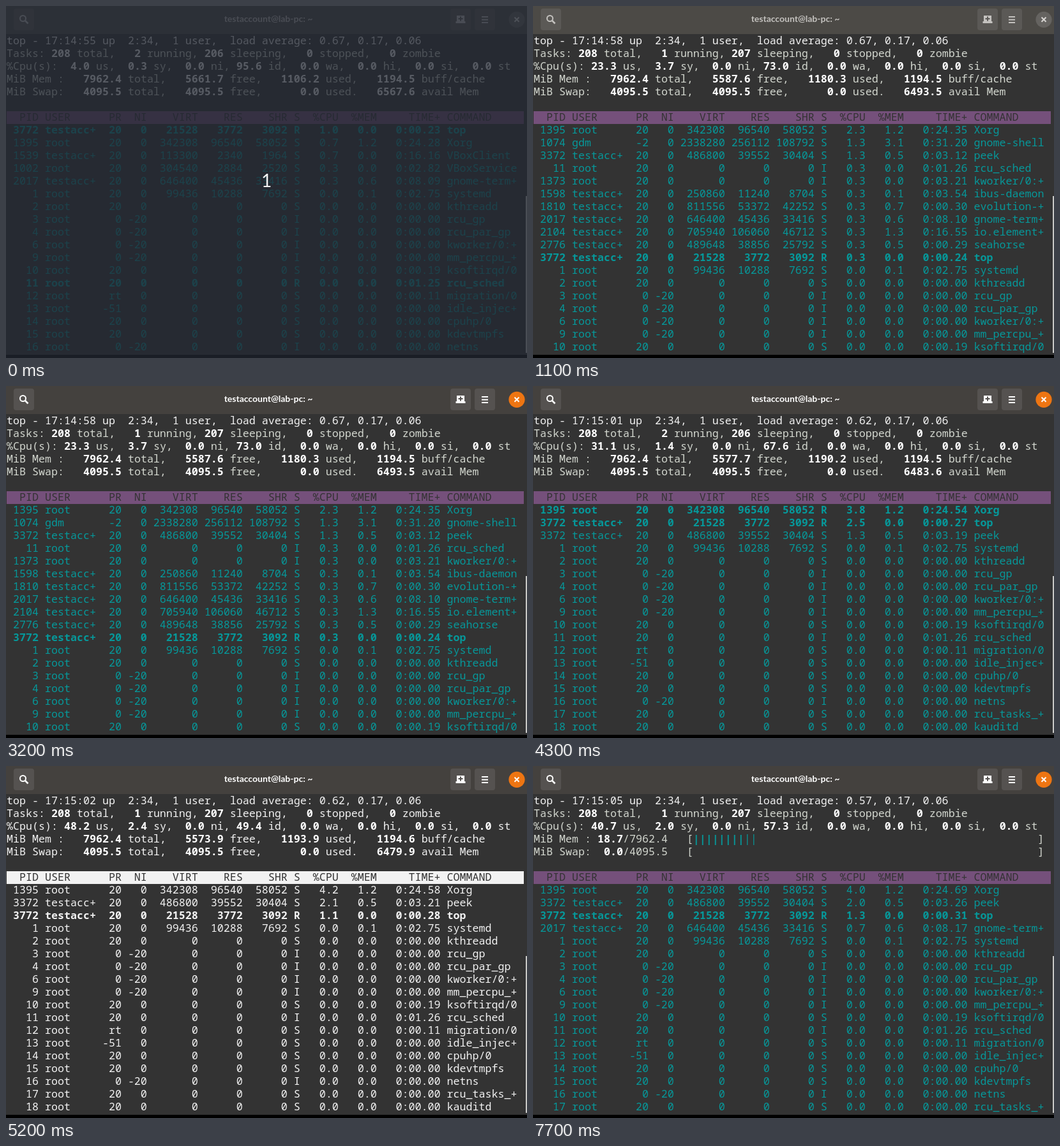
Animation of 816 by 552 pixels, one loop 8000 ms. Source, as an HTML page:

```html
<!DOCTYPE html>
<html lang="en">
<head>
<meta charset="utf-8">
<title>Process monitor</title>
<style>
html, body { margin: 0; width: 100%; height: 100%; overflow: hidden; background: #333; }
svg { display: block; width: 816px; height: 552px; }
.line { font: 16.6667px "Noto Sans Mono", monospace; white-space: pre; fill: #06989a; }
.summary { fill: #d3d7cf; }
.uptime { fill: #f2f2f2; }
.bold { font-weight: 700; }
.summary .bold { fill: #fff; }
.summary .gauge { fill: #06989a; }
.bar { fill: #75507b; }
.columns { fill: #333; }
.mono .line, .mono .bar { fill: #f2f2f2; }
.mono .columns { fill: #333; }
.title { font: 700 14px Lato, "Open Sans", sans-serif; text-anchor: middle; }
.head { fill: #4c4a46; }
.button { fill: #5b5956; }
.ink { fill: #c4c2bf; }
.stroke { fill: none; stroke: #c4c2bf; stroke-width: 2; }
.close { fill: #656360; }
.cross { fill: none; stroke: #d8d6d3; stroke-width: 2; }
.focused .head { fill: #44413e; }
.focused .button { fill: #555250; }
.focused .ink { fill: #fff; }
.focused .stroke, .focused .cross { stroke: #fff; }
.focused .close { fill: #ee7512; }
.count { font: 28px Lato, sans-serif; text-anchor: middle; fill: #f4f4f4; }
</style>
</head>
<body>
<svg id="stage" viewBox="0 0 816 552">
  <rect width="816" height="552" fill="#333"/>
  <rect class="head" width="816" height="44"/>
  <rect class="button" x="12" y="4" width="32" height="34" rx="4"/>
  <rect class="button" x="696" y="4" width="32" height="34" rx="4"/>
  <rect class="button" x="734" y="4" width="32" height="34" rx="4"/>
  <g class="stroke">
    <circle cx="26.5" cy="19.5" r="4.5"/>
    <path d="M29.7 22.7L34.5 27.5" stroke-width="2.6"/>
  </g>
  <text class="title ink" x="411" y="25">testaccount@lab-pc: ~</text>
  <path class="ink" fill-rule="evenodd" d="M706 15H718V24H719.5V27H704.5V24H706ZM711 16.5V19H708.5V21H711V23.5H713V21H715.5V19H713V16.5Z"/>
  <path class="stroke" d="M745 17H755M745 21.5H755M745 26H755"/>
  <circle class="close" cx="800" cy="21.3" r="12.6"/>
  <path class="cross" d="M796.5 17.8L803.5 24.8M803.5 17.8L796.5 24.8"/>
  <g id="screens"></g>
  <rect x="814" y="298" width="2" height="246" fill="#c8c8c6"/>
  <rect y="547" width="816" height="5" fill="#000"/>
  <g id="countdown">
    <rect width="816" height="552" fill="#232832" fill-opacity=".76"/>
    <text class="count" x="408" y="284">1</text>
  </g>
</svg>
<script>
const LOOP = 8000, FOCUS_AT = 3200, COUNTDOWN_END = 200;
const ROWS = 18;
const USER = "testacc+";
const stage = document.getElementById("stage");
const countdown = document.getElementById("countdown");

// pid: command, user, PR, NI, VIRT, RES, SHR, %MEM
const processes = {
  1: ["systemd", "root", 20, 0, 99436, 10288, 7692, "0.1"],
  2: ["kthreadd"], 3: ["rcu_gp", "root", 0, -20], 4: ["rcu_par_gp", "root", 0, -20],
  6: ["kworker/0:+", "root", 0, -20], 9: ["mm_percpu_+", "root", 0, -20],
  10: ["ksoftirqd/0"], 11: ["rcu_sched"], 12: ["migration/0", "root", "rt"],
  13: ["idle_injec+", "root", -51], 14: ["cpuhp/0"], 15: ["kdevtmpfs"],
  16: ["netns", "root", 0, -20], 17: ["rcu_tasks_+"], 18: ["kauditd"],
  1002: ["VBoxService", "root", 20, 0, 304540, 2884, 2520],
  1074: ["gnome-shell", "gdm", -2, 0, 2338280, 256112, 108792, "3.1"],
  1373: ["kworker/0:+"],
  1395: ["Xorg", "root", 20, 0, 342308, 96540, 58052, "1.2"],
  1539: ["VBoxClient", USER, 20, 0, 113300, 2340, 1964],
  1598: ["ibus-daemon", USER, 20, 0, 250860, 11240, 8704, "0.1"],
  1810: ["evolution-+", USER, 20, 0, 811556, 53372, 42252, "0.7"],
  2017: ["gnome-term+", USER, 20, 0, 646400, 45436, 33416, "0.6"],
  2104: ["io.element+", USER, 20, 0, 705940, 106060, 46712, "1.3"],
  2776: ["seahorse", USER, 20, 0, 489648, 38856, 25792, "0.5"],
  3372: ["peek", USER, 20, 0, 486800, 39552, 30404, "0.5"],
  3772: ["top", USER, 20, 0, 21528, 3772, 3092]
};
const idlePids = [1, 2, 3, 4, 6, 9, 10, 11, 12, 13, 14, 15, 16, 17, 18];
const idleTimes = { 1: "0:02.75", 10: "0:00.19", 11: "0:01.26", 12: "0:00.11" };
const idleKernel = [3, 4, 6, 9, 11, 16, 1373];

// busy entries: pid, %CPU, TIME+, and "R" when running
const screens = [
  { at: 0, clock: "14:55", load: "0.67", running: 2, cpu: [4, .3, 95.6],
    mem: [5661.7, 1106.2, 1194.5, 6567.6], rcu: ["R", "0:01.25"],
    busy: "3772 1.0 0:00.23 R,1395 0.7 0:24.28,1539 0.7 0:16.16,1002 0.3 0:02.82,2017 0.3 0:08.09" },
  { at: 1100, clock: "14:58", load: "0.67", running: 1, cpu: [23.3, 3.7, 73],
    mem: [5587.6, 1180.3, 1194.5, 6493.5],
    busy: "1395 2.3 0:24.35,1074 1.3 0:31.20,3372 1.3 0:03.12,11 0.3 0:01.26,1373 0.3 0:03.21," +
      "1598 0.3 0:03.54,1810 0.3 0:00.30,2017 0.3 0:08.10,2104 0.3 0:16.55,2776 0.3 0:00.29,3772 0.3 0:00.24 R" },
  { at: 3400, mono: true, clock: "15:00", load: "0.62", running: 1, cpu: [32.4, 2.5, 65.1],
    mem: [5580.2, 1187.7, 1194.5, 6486.1],
    busy: "1395 5.0 0:24.51,3372 2.1 0:03.18,2017 0.8 0:08.13,3772 0.4 0:00.25 R" },
  { at: 4300, clock: "15:01", load: "0.62", running: 2, cpu: [31.1, 1.4, 67.6],
    mem: [5577.7, 1190.2, 1194.5, 6483.6],
    busy: "1395 3.8 0:24.54 R,3772 2.5 0:00.27 R,3372 1.3 0:03.19" },
  { at: 5200, mono: true, clock: "15:02", load: "0.62", running: 1, cpu: [48.2, 2.4, 49.4],
    mem: [5573.9, 1193.9, 1194.6, 6479.9],
    busy: "1395 4.2 0:24.58,3372 2.1 0:03.21,3772 1.1 0:00.28 R" },
  { at: 6100, clock: "15:03", load: "0.62", running: 2, cpu: [63.9, 2.1, 34],
    mem: [5570.4, 1197.4, 1194.6, 6476.4], rcu: ["R", "0:01.26"],
    busy: "1395 4.5 0:24.63,3372 1.8 0:03.23,2017 0.9 0:08.16" },
  { at: 7700, clock: "15:05", load: "0.57", running: 1, cpu: [40.7, 2, 57.3],
    busy: "1395 4.0 0:24.69,3372 2.0 0:03.26,3772 1.3 0:00.31 R,2017 0.7 0:08.17" }
];

// Positive widths align right, negative ones left.
const widths = [5, -8, 3, 3, 7, 6, 6, 1, 5, 5, 9, -11];
const formatRow = cells => cells.map((cell, i) =>
  widths[i] < 0 ? String(cell).padEnd(-widths[i]) : String(cell).padStart(widths[i])).join(" ");
const fixed = (n, width) => n.toFixed(1).padStart(width);
const line = (row, content, cls = "") =>
  `<text class="line ${cls}" x="1" y="${60 + 20 * row}">${content}</text>`;
const boldNumbers = s => s.replace(/(?<![\/\d.])\d[\d.]*/g, '<tspan class="bold">$&</tspan>');

function processRow(pid, cpu, time, state) {
  const [command, user = "root", pr = 20, ni = 0, virt = 0, res = 0, shr = 0, mem = "0.0"] = processes[pid];
  return formatRow([pid, user, pr, ni, virt, res, shr, state, cpu, mem, time, command]);
}

function memoryLines({ mem }) {
  if (!mem) {
    const gap = n => " ".repeat(n);
    const gauge = '<tspan class="gauge bold">||||||||</tspan><tspan class="gauge">||</tspan>';
    return [boldNumbers("MiB Mem : 18.7/7962.4   [") + gauge + gap(44) + "]",
            boldNumbers("MiB Swap:  0.0/4095.5   [") + gap(54) + "]"];
  }
  const [free, used, cache, avail] = mem;
  return [
    `MiB Mem : ${fixed(7962.4, 8)} total, ${fixed(free, 8)} free, ${fixed(used, 8)} used, ${fixed(cache, 8)} buff/cache`,
    `MiB Swap: ${fixed(4095.5, 8)} total, ${fixed(4095.5, 8)} free, ${fixed(0, 8)} used. ${fixed(avail, 8)} avail Mem`
  ].map(boldNumbers);
}

function buildScreen(screen) {
  const [us, sy, id] = screen.cpu.map(n => fixed(n, 4));
  const top = [
    boldNumbers(`Tasks: 208 total,   ${screen.running} running, ${208 - screen.running} sleeping,   0 stopped,   0 zombie`),
    boldNumbers(`%Cpu(s): ${us} us, ${sy} sy,  0.0 ni, ${id} id,  0.0 wa,  0.0 hi,  0.0 si,  0.0 st`),
    ...memoryLines(screen)
  ];
  const busy = screen.busy.split(",").map(entry => {
    const [pid, cpu, time, state] = entry.split(" ");
    return [+pid, cpu, time, state || (idleKernel.includes(+pid) ? "I" : "S")];
  });
  const listed = busy.map(entry => entry[0]);
  const idle = idlePids.filter(pid => !listed.includes(pid)).map(pid => {
    const [state, time] = pid === 11 && screen.rcu ||
      [idleKernel.includes(pid) ? "I" : "S", idleTimes[pid] || "0:00.00"];
    return [pid, "0.0", time, state];
  });
  const columns = formatRow("PID USER PR NI VIRT RES SHR S %CPU %MEM TIME+ COMMAND".split(" "));
  return `<g class="${screen.mono ? "mono" : ""}">` +
    line(0, `top - 17:${screen.clock} up  2:34,  1 user,  load average: ${screen.load}, 0.17, 0.06`, "uptime") +
    top.map((text, i) => line(i + 1, text, "summary")).join("") +
    '<rect class="bar" x="1" y="165" width="810" height="20"/>' +
    line(6, columns, "columns") +
    [...busy, ...idle].slice(0, ROWS).map((entry, i) =>
      line(i + 7, processRow(...entry), entry[3] === "R" ? "bold" : "")).join("") +
    "</g>";
}

const layer = document.getElementById("screens");
layer.innerHTML = screens.map(buildScreen).join("");
const groups = [...layer.children];

function render(t) {
  const current = screens.filter(screen => screen.at <= t).length - 1;
  groups.forEach((group, i) => group.setAttribute("display", i === current ? "inline" : "none"));
  stage.classList.toggle("focused", t >= FOCUS_AT);
  countdown.setAttribute("display", t < COUNTDOWN_END ? "inline" : "none");
}

const start = performance.now();
function tick() {
  render((performance.now() - start) % LOOP);
  requestAnimationFrame(tick);
}
tick();
</script>
</body>
</html>
```
